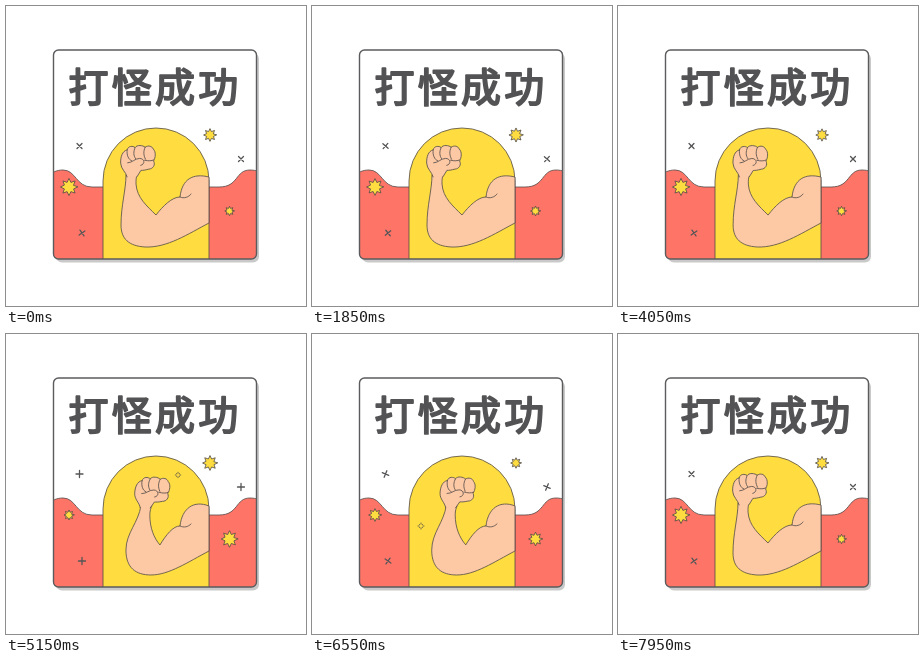
An HTML page for the animation above (8000 ms loop, 300 by 300 pixels).

```html
<!DOCTYPE html>
<html lang="zh-Hant">
<head>
<meta charset="utf-8">
<style>
html, body { margin: 0; width: 100%; height: 100%; overflow: hidden; background: #fff; }
svg { display: block; width: 300px; height: 300px; }
text { font: 500 40px "Noto Sans CJK TC", "Noto Sans CJK SC", "Noto Sans CJK", sans-serif; letter-spacing: 3.2px; }
.line { fill: none; stroke: #514b48; stroke-width: .8; stroke-linecap: round; stroke-linejoin: round; }
.skin { fill: #fdc8a4; }
.star { fill: #ffdd40; }
.cross { stroke: #555557; stroke-width: 1.3; }
</style>
</head>
<body>
<svg viewBox="0 0 300 300">
  <defs><clipPath id="card"><rect x="47.5" y="44" width="203" height="209" rx="5"/></clipPath></defs>
  <rect x="50" y="47" width="203" height="209.500" rx="6" fill="#c9c9c9"/>
  <rect x="47.5" y="44" width="203" height="209" rx="5" fill="#fff"/>
  <g clip-path="url(#card)">
    <path class="line" style="fill:#fe7467" d="M40 171C46 166 51 164 57 164C70 164 70 181 86 181H97L203 181H213C233 181 229 164 244 164C250 164 256 166 260 170V270H40Z"/>
    <path class="line" style="fill:#ffdd40" d="M97 260V175a53 53 0 0 1 106 0V260"/>
    <path id="arm" class="line skin"/>
    <path id="fold" class="line"/>
    <g id="fist">
      <path class="line skin" d="M-11 18C-12 13 -17 10 -17 4C-17 -2 -15 -8 -10 -9C-9 -13 -4 -13 -2 -11C0 -14 6 -13 8 -11C11 -13 15 -12 16 -9C19 -6 18 0 16 3C18 7 15 11 11 11C7 12 5 12 3 12L-1 18"/>
      <path class="line" d="M-10 -9C-11 -4 -9 1 -6 2M-2 -11C-4 -7 -4 -3 -2 0M8 -11C6 -7 6 -3 8 1M-10 4C-5 4 -3 0 2 0C7 0 8 6 3 7M7 2C11 3 14 3 16 2"/>
    </g>
    <g id="bits"></g>
  </g>
  <rect x="47.500" y="44" width="203" height="209" rx="5" fill="none" stroke="#5b5b5e" stroke-width="1.400"/>
  <text x="149" y="95.800" text-anchor="middle" fill="#535355" stroke="#535355" stroke-width="1.900" stroke-linejoin="round">打怪成功</text>
</svg>
<script>
const $ = id => document.getElementById(id);
const mix = (a, b, p) => a + (b - a) * p;

// Two poses with matching commands
const arms = [
  'M120 169C120 184 115 199 115 219C115 233 123 240 139 241C161 242 182 228 203 217V171C187 167 176 173 174 191C166 191 157 200 150 209C141 200 131 192 130 178C130 174 130 172 131 169',
  'M135 172C133 188 120 199 120 216C120 234 130 241 145 241C163 241 182 228 203 217V172C188 166 176 174 174 192C167 192 160 201 154 211C148 204 144 194 144 181C144 177 145 174 146 172'
];
const folds = ['M174 191C178 193 183 191 185 188', 'M174 192C178 194 182 193 185 190'];
function blend([a, b], p) {
  const nums = b.match(/[\d.]+/g);
  let i = 0;
  return a.replace(/[\d.]+/g, n => mix(+n, +nums[i++], p).toFixed(2));
}

// Smooth interpolation through [time, value] pairs
function track(keys, t) {
  const i = keys.findIndex(k => k[0] > t);
  const [t0, a] = keys[i - 1], [t1, b] = keys[i];
  return mix(a, b, (1 - Math.cos(Math.PI * (t - t0) / (t1 - t0))) / 2);
}
const flexKeys = [[0, 0], [500, .95], [870, .78], [1200, 1], [1850, 0], [2000, 0]];
const turnKeys = [[0, 45], [1100, 0], [2000, 45]];
const lowTurnKeys = [[0, 55], [800, 30], [950, 0], [1150, 0], [2000, 55]];

function add(cls, d) {
  const el = document.createElementNS('http://www.w3.org/2000/svg', 'path');
  el.setAttribute('class', 'line ' + cls);
  el.setAttribute('d', d);
  el.setAttribute('vector-effect', 'non-scaling-stroke');
  $('bits').append(el);
  return el;
}
function starPath() {
  let d = '';
  for (let i = 0; i < 16; i++) {
    const a = i * Math.PI / 8, r = i % 2 ? .58 : 1;
    d += (i ? 'L' : 'M') + r * Math.cos(a) + ' ' + r * Math.sin(a);
  }
  return d + 'Z';
}
function place(el, x, y, size, turn = 0) {
  el.setAttribute('transform', `translate(${x} ${y}) rotate(${turn}) scale(${size})`);
}
// Each star: x, y, mean radius, swing, time of the peak
const stars = [[63, 181, 6.7, 1.9, 0], [223.5, 205, 6.6, 1.9, 1000], [204, 129, 6.6, 1.4, 1450]]
  .map(s => [add('star', starPath()), ...s]);
const crosses = [[73.5, 140, turnKeys], [235, 153, turnKeys], [76, 227, lowTurnKeys]]
  .map(c => [add('cross', 'M-3.500 0H3.500M0 -3.500V3.500'), ...c]);
// Each spark: x, y, start time
const sparks = [[109, 192, 450], [172, 141, 1080]]
  .map(s => [add('', 'M-4 0H-2.500M2.500 0H4M0 -4V-2.500M0 2.500V4M-2.200 -2.200l.4 .4M2.200 -2.200l-.4 .4M-2.200 2.200l.4 -.4M2.200 2.200l-.4 -.4'), ...s]);

function draw(now) {
  const t = Math.floor(now % 2000 / 50) * 50;
  const flex = track(flexKeys, t);

  $('arm').setAttribute('d', blend(arms, flex));
  $('fold').setAttribute('d', blend(folds, flex));
  place($('fist'), mix(131.5, 146, flex), mix(152.5, 156, flex), 1, mix(-2, 2, flex));

  for (const [el, x, y, size, swing, peak] of stars)
    place(el, x, y, size + swing * Math.cos((t - peak) * Math.PI / 1000));
  for (const [el, x, y, keys] of crosses) place(el, x, y, 1, track(keys, t));
  for (const [el, x, y, start] of sparks) {
    const p = (t - start) / 600;
    el.style.display = p > 0 && p < 1 ? '' : 'none';
    place(el, x, y, .5 + .5 * Math.sin(Math.PI * p));
  }
}
const begin = performance.now();
function loop() {
  draw(performance.now() - begin);
  requestAnimationFrame(loop);
}
loop();
</script>
</body>
</html>
```
